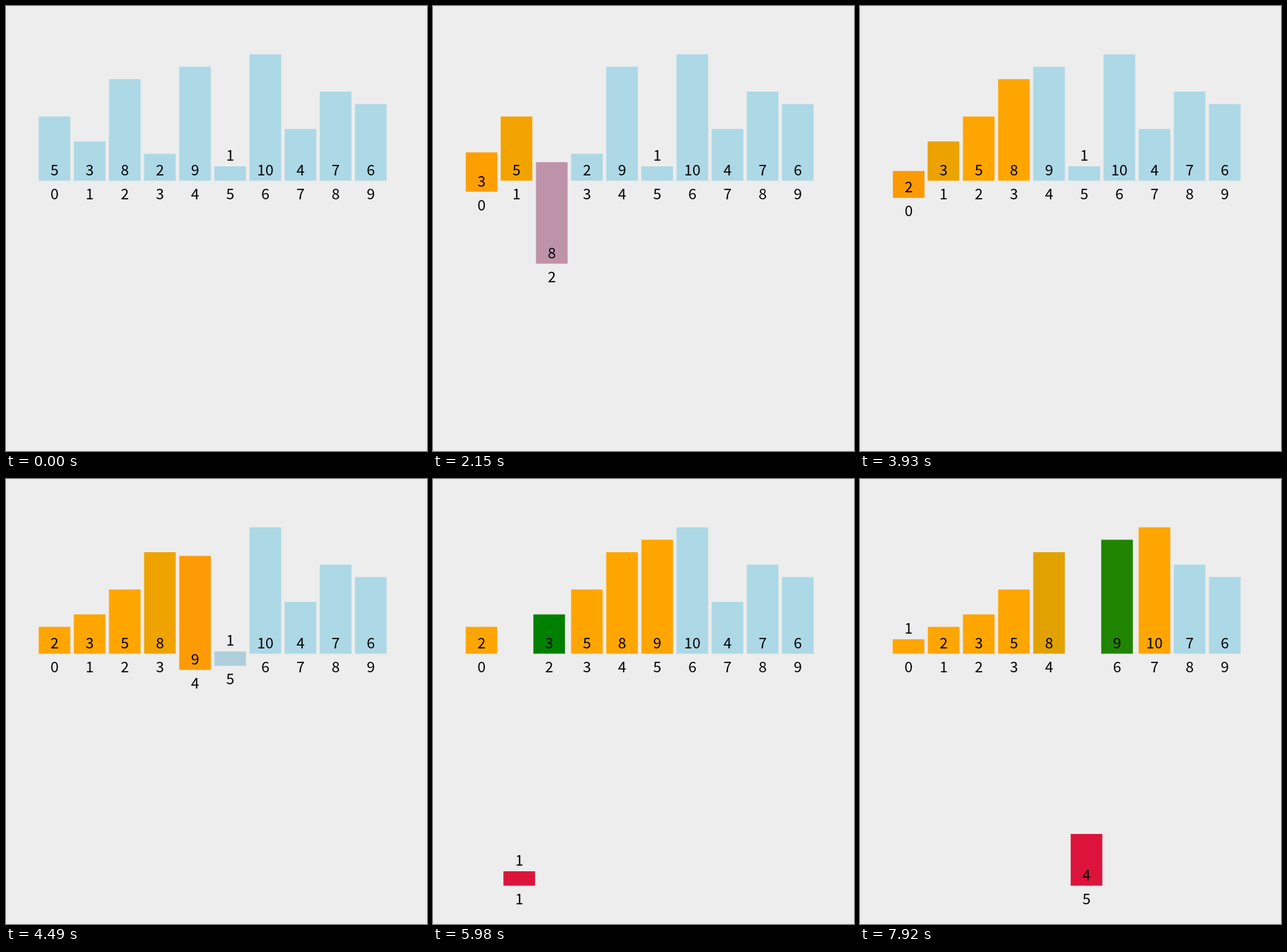
An HTML page for the animation above (8 s loop, 599 px wide and 633 px high).

```html
<!DOCTYPE html>
<html lang="en">
<head>
<meta charset="utf-8">
<title>Insertion sort</title>
<style>
  html, body { margin: 0; width: 100%; height: 100%; overflow: hidden; background: #ededed; }
  svg { display: block; width: 599px; height: 633px; }
  text { font: 21px "Noto Sans CJK JP", "Noto Sans CJK SC", "Noto Sans", sans-serif; text-anchor: middle; fill: #000; }
</style>
</head>
<body>
<svg viewBox="0 0 599 633"></svg>
<script>
const LOOP = 8000, FIRST_STEP = 1194, STEP = 170.65, DURATION = 232;
const LEFT = 46.5, PITCH = 50, WIDTH = 45, BASE = 248.5, UNIT = 17.7, DROP = 330;
const BLUE = [173, 216, 230], ORANGE = [255, 165, 0], GREEN = [0, 128, 0], RED = [220, 20, 60];
const VALUES = [5, 3, 8, 2, 9, 1, 10, 4, 7, 6];

// Insertion sort, recorded as the pose every bar moves towards in each step.
function sortingSteps() {
  const bars = VALUES.map((value, slot) => ({ value, slot, y: 0, color: BLUE }));
  const order = [...bars];
  const steps = [];
  const record = () => steps.push(bars.map(bar => ({ ...bar, x: bar.slot * PITCH })));

  record();
  order[0].color = ORANGE;
  record();
  for (let i = 1; i < order.length; i++) {
    const key = order[i];
    key.color = RED;
    key.y = DROP;
    record();
    for (let j = i - 1; j >= 0; j--) {
      const other = order[j];
      if (j < i - 1) order[j + 2].color = ORANGE;
      other.color = GREEN;
      record();
      if (other.value < key.value) break;
      order[j] = key;
      order[j + 1] = other;
      key.slot = j;
      other.slot = j + 1;
      record();
    }
    for (let j = 0; j <= i; j++) order[j].color = ORANGE;
    key.y = 0;
    record();
  }
  return steps;
}

const lerp = (a, b, q) => a + (b - a) * q;

function ease(u) {
  u = Math.min(1, Math.max(0, u));
  return u < 0.5 ? 4 * u ** 3 : 1 - 4 * (1 - u) ** 3;
}

const blend = (from, to, q) => to.map((bar, i) => ({
  ...bar,
  x: lerp(from[i].x, bar.x, q),
  y: lerp(from[i].y, bar.y, q),
  color: bar.color.map((c, n) => lerp(from[i].color[n], c, q))
}));

// Each step interrupts the one before, so it starts from wherever the bars are.
const steps = sortingSteps();
const starts = [steps[0]];
steps.slice(0, -1).forEach((step, k) => starts.push(blend(starts[k], step, ease(STEP / DURATION))));

const svg = document.querySelector("svg");

function add(parent, tag, attributes = {}) {
  const node = document.createElementNS(svg.namespaceURI, tag);
  for (const name in attributes) node.setAttribute(name, attributes[name]);
  return parent.appendChild(node);
}

const views = VALUES.map(value => {
  const group = add(svg, "g");
  const height = UNIT * value + 2.8;
  const center = LEFT + WIDTH / 2;
  const rect = add(group, "rect", { x: LEFT, y: BASE - height, width: WIDTH, height });
  const number = add(group, "text", { x: center, y: value > 1 ? 241 : 220 });
  const label = add(group, "text", { x: center, y: 275 });
  number.textContent = value;
  return { group, rect, label };
});

function draw() {
  const elapsed = performance.now() % LOOP - FIRST_STEP;
  const k = Math.max(0, Math.floor(elapsed / STEP) + 1);
  const pose = blend(starts[k], steps[k], ease((elapsed - (k - 1) * STEP) / DURATION));
  pose.forEach((bar, i) => {
    const { group, rect, label } = views[i];
    group.setAttribute("transform", `translate(${bar.x} ${bar.y})`);
    rect.setAttribute("fill", `rgb(${bar.color.map(Math.round)})`);
    label.textContent = bar.slot;
  });
  requestAnimationFrame(draw);
}
draw();
</script>
</body>
</html>
```
